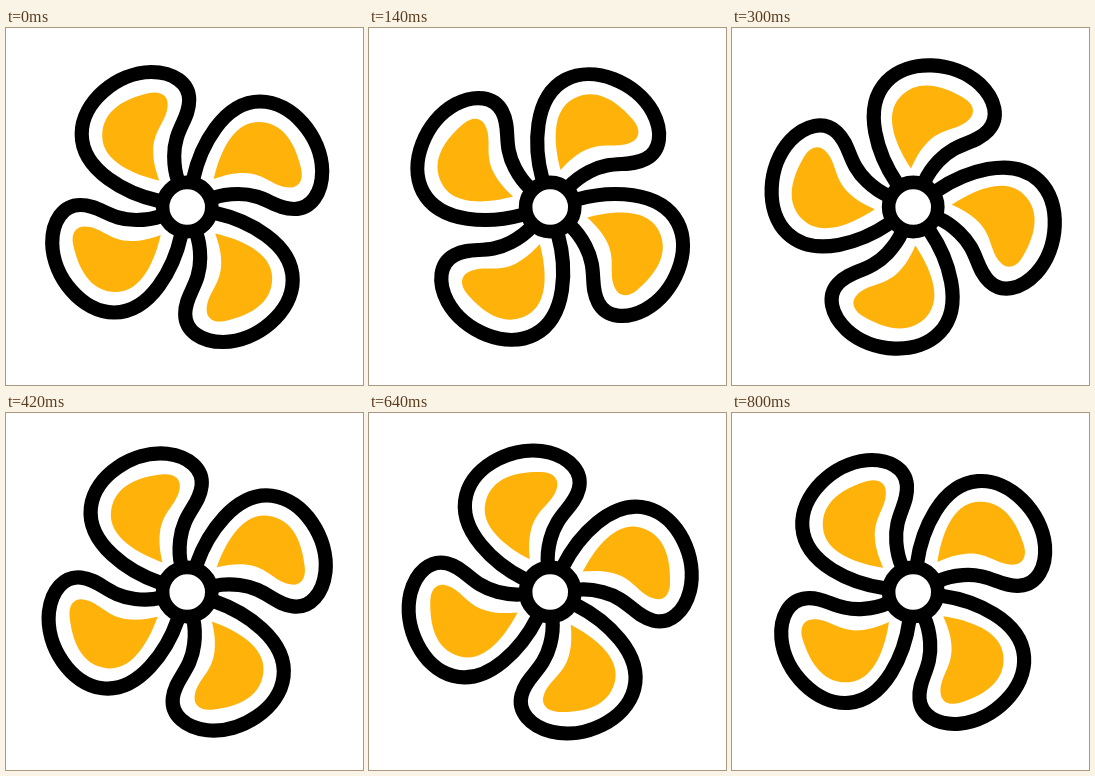
Write an HTML page that moves like this. It is 357 px wide and 357 px high and loops after 820 ms.

```html
<!DOCTYPE html>
<html lang="en">
<head>
<meta charset="utf-8">
<title>Spinning fan</title>
<style>
  html, body { margin: 0; width: 100%; height: 100%; overflow: hidden; background: #fff; }
  svg { display: block; width: 100vw; height: 100vh; }
  .rim { fill: none; stroke: #000; stroke-width: 14.2; stroke-linejoin: round; }
  .core { fill: #ffb20a; }
</style>
</head>
<body>
<svg viewBox="0 0 357 357">
  <defs>
    <g id="blade">
      <path class="rim" d="M6,-28 C13,-60 36,-105.5 73,-105.5 C105,-105.5 134.5,-70 135,-36
        C135,-14 124,2 107,2 C87,2 78,-13 51,-13 C42,-13 34,-12 26,-9"/>
      <path class="core" d="M26.5,-28 C32,-52 45,-85 71,-85 C98,-85 109,-60 114,-38
        C116.5,-26 111,-19.5 103,-19.5 C86,-19.5 78,-34 56,-34 C46,-34 38,-32 26.5,-28Z"/>
    </g>
  </defs>
  <g transform="translate(181.2 179)">
    <g id="fan">
      <use href="#blade"/>
      <use href="#blade" transform="rotate(90)"/>
      <use href="#blade" transform="rotate(180)"/>
      <use href="#blade" transform="rotate(270)"/>
    </g>
    <circle r="24.6" fill="#fff" stroke="#000" stroke-width="13.6"/>
  </g>
</svg>
<script>
  const LOOP = 820, STEP = 20, TURN = 810; // ms
  const fan = document.getElementById('fan');
  const start = performance.now();

  function draw() {
    const t = (performance.now() - start) % LOOP;
    const held = Math.floor(t / STEP) * STEP;
    fan.setAttribute('transform', `rotate(${360 * held / TURN})`);
    requestAnimationFrame(draw);
  }
  draw();
</script>
</body>
</html>
```
